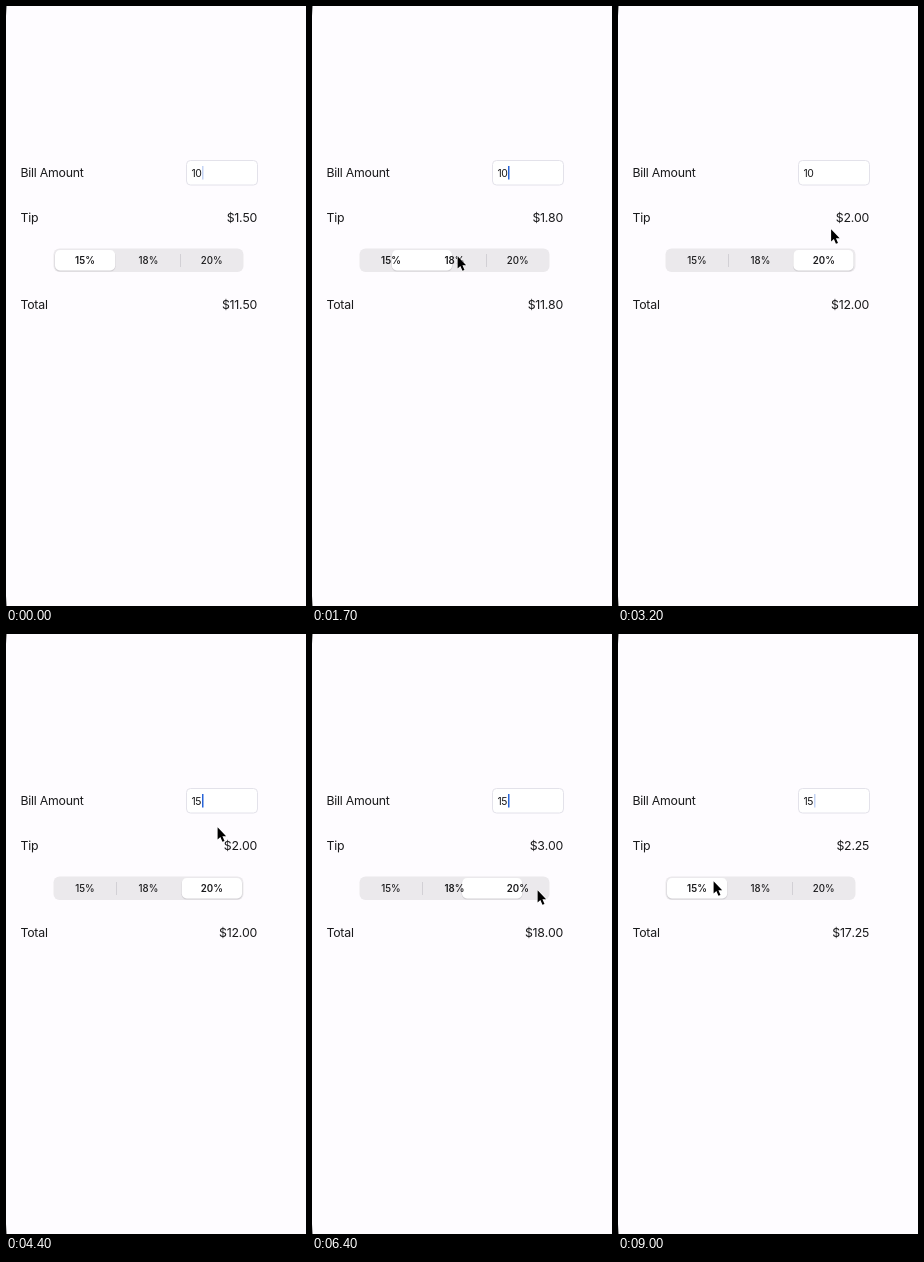
Animation, 300 px wide and 600 px high, one loop 9.1 s. Source, as an HTML page:

```html
<!DOCTYPE html>
<html lang="en">
<head>
<meta charset="utf-8">
<title>Tip calculator</title>
<style>
html, body { margin: 0; width: 100%; height: 100%; overflow: hidden; background: #fefcff; }
svg { display: block; width: 300px; height: 600px; }
text { font: 12.3px Inter, sans-serif; letter-spacing: -.24px; fill: #1a1a1c; }
.seg { font-size: 9.7px; letter-spacing: 0; text-anchor: middle; }
.money { text-anchor: end; font-kerning: none; }
#bill { font-size: 10.4px; letter-spacing: -.4px; }
</style>
</head>
<body>
<svg viewBox="0 0 300 600">
  <path d="M0 0H.8Q.4 5 0 10ZM0 590Q.4 595 .8 600H0Z" fill="#666"/>
  <text x="14.5" y="171.3">Bill Amount</text>
  <text x="14.5" y="216">Tip</text>
  <text x="14.5" y="303.3">Total</text>
  <rect x="180.5" y="154.5" width="71" height="24.5" rx="4" fill="#fff" stroke="#e3e2ea"/>
  <text id="bill" x="185.5" y="170.5"></text>
  <rect id="caret" y="160" width="1.5" height="13.5" fill="#2864d8"/>
  <text id="tip" class="money" x="251" y="216"></text>
  <text id="total" class="money" x="251" y="303"></text>
  <rect x="47.5" y="242.5" width="190" height="23.5" rx="6" fill="#ebe9ec"/>
  <g id="seps" fill="#d2d0d5"></g>
  <g id="thumb">
    <rect x="48.6" y="244.4" width="61" height="21.2" rx="5.3" fill="#d3d1d5"/>
    <rect x="49" y="244" width="60.2" height="20.5" rx="5" fill="#fff"/>
  </g>
  <g id="labels"></g>
  <g id="mouse">
    <path d="M0 0V13L3 10.3 5.2 15.6 7.4 14.6 5.2 9.6H9.2Z" transform="translate(.6 1.3) scale(.93)"
      stroke="#fff" stroke-width="1.2" stroke-linejoin="round" paint-order="stroke"/>
  </g>
</svg>
<script>
const LOOP = 9100, STEP = 100, PITCH = 63.4, TYPED = 4300;
const rates = [15, 18, 20];

const picks = [
  { at: 0, seg: 0 }, { at: 1610, seg: 1 }, { at: 2810, seg: 2 },
  { at: 5410, seg: 1 }, { at: 6290, seg: 2 }, { at: 7490, seg: 0 }
];
const glides = [
  { from: 300, to: 500, x: 175, y: 374 },
  { from: 700, to: 1400, x: 145, y: 249 },
  { from: 1900, to: 2500, x: 214, y: 252 },
  { from: 2900, to: 3500, x: 211, y: 192 },
  { from: 4700, to: 5400, x: 163, y: 252 },
  { from: 5800, to: 6100, x: 225, y: 255 },
  { from: 6400, to: 7000, x: 49, y: 252 },
  { from: 7200, to: 7400, x: 95, y: 246 }
];

const $ = id => document.getElementById(id);
const clamp = v => Math.max(0, Math.min(1, v));
const smooth = u => u * u * (3 - 2 * u);
const spring = k => 1 - (1 + k) * Math.exp(-k);
const money = v => '$' + v.toFixed(2);

function add(parent, tag, attrs, text = '') {
  const el = document.createElementNS('http://www.w3.org/2000/svg', tag);
  for (const name in attrs) el.setAttribute(name, attrs[name]);
  el.textContent = text;
  return $(parent).appendChild(el);
}

const labels = rates.map((r, i) =>
  add('labels', 'text', { class: 'seg', x: 79 + PITCH * i, y: 257.5 }, r + '%'));
const seps = [0, 1].map(i =>
  add('seps', 'rect', { x: 110 + 64 * i, y: 248, width: 1, height: 13 }));

function drawPicker(t) {
  const n = picks.filter(p => p.at <= t).length - 1;
  const { at, seg } = picks[n];
  const last = picks[Math.max(0, n - 1)].seg;
  const pos = last + (seg - last) * spring((t - at) / 55);
  $('thumb').setAttribute('transform', `translate(${pos * PITCH} 0)`);
  seps.forEach((s, i) => s.setAttribute('opacity', clamp(Math.abs(pos - i - .5) * 2 - 1)));
  labels.forEach((l, i) => l.style.fontWeight = Math.abs(pos - i) < .6 ? 560 : 450);

  // results refresh only when a segment is picked
  const bill = at < TYPED ? 10 : 15, tip = bill * rates[seg] / 100;
  $('tip').textContent = money(tip);
  $('total').textContent = money(bill + tip);
}

function drawField(t) {
  const typing = t >= TYPED && t < TYPED + STEP;
  $('bill').textContent = t < TYPED ? '10' : typing ? '1' : '15';
  $('caret').setAttribute('x', typing ? 190 : 196);
  const phase = (t / 1000 + .87) % 1;
  $('caret').setAttribute('opacity', clamp((.42 - Math.abs(phase - .5)) * 5.5));
}

function drawMouse(t) {
  let x = 252, y = 390;
  for (const g of glides) {
    const u = smooth(clamp((t - g.from) / (g.to - g.from)));
    x += (g.x - x) * u;
    y += (g.y - y) * u;
  }
  $('mouse').setAttribute('visibility', t < glides[0].from ? 'hidden' : 'visible');
  $('mouse').setAttribute('transform', `translate(${x} ${y})`);
}

const origin = performance.now();
function tick() {
  const t = Math.floor((performance.now() - origin) % LOOP / STEP) * STEP;
  drawPicker(t);
  drawField(t);
  drawMouse(t);
  requestAnimationFrame(tick);
}
tick();
</script>
</body>
</html>
```
